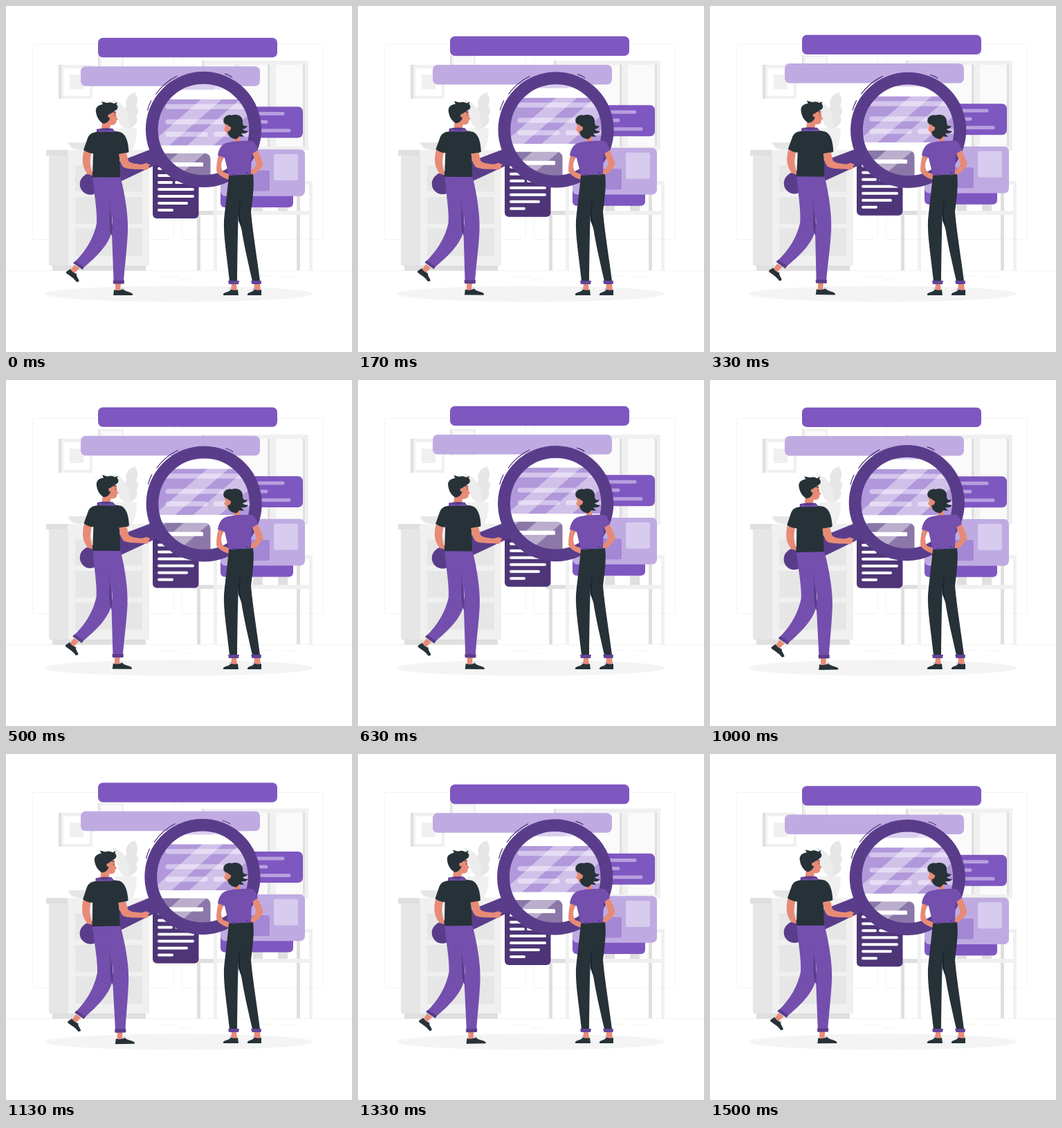
An HTML page that plays this animation: 500x500 px, repeating every 1540 ms.

```html
<!DOCTYPE html>
<html lang="en">
<head>
<meta charset="utf-8">
<title>Search illustration</title>
<style>
  html, body { margin: 0; width: 100%; height: 100%; overflow: hidden; background: #fff; }
  svg { display: block; width: 100%; height: 100%; }
  .dark { fill: #263238; }
  .plum { fill: #5a3d8a; }
  .violet { fill: #744fae; }
  .skin { fill: #e78b77; }
  .g1 { fill: #f0f0f0; }
  .g2 { fill: #e6e6e6; }
  .g3 { fill: #dfdfdf; }
  .pane { fill: #fafafa; }
  .deep { fill: #7f57c1; }
  .pale { fill: #bfabe2; }
</style>
</head>
<body>
<svg viewBox="0 0 500 500" xmlns="http://www.w3.org/2000/svg">
  <defs>
    <clipPath id="glass"><circle id="hole" cx="285.5" cy="178.5" r="67"/></clipPath>
  </defs>

  <!-- room -->
  <g fill="none" stroke="#f3f3f3">
    <rect x="38.5" y="55.5" width="204" height="282" rx="3"/>
    <rect x="254.5" y="55.5" width="204" height="282" rx="3"/>
    <path d="M0 382.5H500M223 391.5h25M249 395.5h15M372 390.5h10M400 391.5h19"/>
  </g>
  <ellipse cx="249.5" cy="416" rx="194" ry="11.5" fill="#f4f4f4"/>

  <g id="frames">
    <rect class="g1" x="133" y="71" width="37" height="38"/>
    <rect class="g3" x="133" y="71" width="2" height="38"/>
    <rect class="pane" x="138" y="74" width="29" height="31"/>
    <rect class="g1" x="76" y="85" width="49" height="49"/>
    <rect class="g3" x="76" y="85" width="4" height="49"/>
    <rect fill="#fff" x="83" y="90" width="38" height="40"/>
    <rect class="g1" x="92" y="99" width="20" height="21"/>
  </g>

  <g id="window">
    <rect class="g1" x="283" y="79" width="154" height="130"/>
    <rect class="g3" x="283" y="79" width="3" height="130"/>
    <rect class="pane" x="289" y="85" width="42" height="118"/>
    <rect class="pane" x="340" y="85" width="38" height="118"/>
    <rect class="pane" x="390" y="85" width="39" height="118"/>
    <path class="g3" d="M331 85h3v118h-3zM378 85h3.500v118h-3.500zM429 85h3v118h-3z"/>
  </g>

  <g id="table">
    <path class="g1" d="M432 253h11v129h-5V258h-6zM300 253h5v129h-5z"/>
    <path class="g3" d="M276 302h5v80h-5zM420 258h5v124h-5zM357 282h14v14h-14zM393 282h14v14h-14z"/>
    <rect class="g1" x="271" y="296" width="172" height="6"/>
    <rect class="g3" x="271" y="296" width="29" height="6"/>
  </g>

  <g id="cabinet">
    <path class="g2" d="M172 178C168 160 171 150 174 145C171 135 178 127 186 125C190 131 192 138 188 145C192 149 192 155 188 159C192 165 188 172 182 175L176 180Z"/>
    <path fill="#ececec" d="M176 180C164 175 160 160 158 150C156 144 155 139 153 135C168 139 178 150 180 178Z"/>
    <path class="g1" d="M158 177H189C189 192 186 202 182 208H165C160 200 158 190 158 177Z"/>
    <path class="g2" d="M90 197H126C125 204 118 208 108 208S91 204 90 197Z"/>
    <rect class="g1" x="89" y="208" width="122" height="8"/>
    <rect class="g3" x="58" y="208" width="31" height="8"/>
    <rect class="g3" x="67" y="375" width="135" height="7.500"/>
    <rect class="g2" x="62" y="216" width="28" height="159"/>
    <rect class="g1" x="90" y="216" width="117" height="159"/>
    <path class="g2" d="M100 230h97v38h-97zM100 276h97v38.500h-97zM100 321.500h97v39.500h-97z"/>
  </g>

  <!-- floating panels -->
  <g id="panels">
    <rect class="deep" x="133" y="46" width="259" height="28.300" rx="7"/>
    <rect class="pale" x="108" y="87.300" width="259" height="28.500" rx="7"/>
    <rect class="deep" x="330" y="145.600" width="99" height="45" rx="7"/>
    <path d="M340 155.500H400M340 167.500H376M340 180H409" stroke="#b79fdf" stroke-width="5" stroke-linecap="round"/>
    <rect class="deep" x="310" y="225" width="105" height="66" rx="6"/>
    <rect class="pale" x="310" y="207.300" width="122" height="67.500" rx="7"/>
    <rect x="387" y="214" width="35" height="38" rx="3" fill="#d7cbee"/>
    <rect x="340" y="237.500" width="41" height="30" rx="3" fill="#a488d3"/>
    <rect x="212" y="213" width="66.500" height="94" rx="6" fill="#4e3578"/>
    <path d="M221 235h9M221 245h18M221 255h18M246 255h24M221 265h49M221 275h49M221 285h40M221 295h19" stroke="#fff" stroke-width="4" stroke-linecap="round"/>
  </g>

  <!-- view through the glass -->
  <g clip-path="url(#glass)">
    <rect x="200" y="90" width="180" height="180" fill="#fff"/>
    <g id="zoom">
      <rect x="190" y="80" width="180" height="41" fill="#d9cdee"/>
      <rect x="190" y="135" width="180" height="66.500" fill="#b198da"/>
      <path d="M234 145.500H350M234 167.500H311M234 185.500H288M303.500 185.500H350" stroke="#d3c5ec" stroke-width="7.200" stroke-linecap="round"/>
      <rect x="190" y="213" width="105.500" height="60" rx="8" fill="#8b78a9"/>
      <rect x="215" y="226" width="70" height="6" rx="1.500" fill="#fff"/>
    </g>
    <g id="glare" fill="#fff" fill-opacity=".4">
      <path d="M282 135L312 135L186 245H156ZM282 135L328 95H358L312 135Z"/>
      <path d="M338 135L376 135L250 245H212Z"/>
    </g>
  </g>

  <!-- man with magnifier -->
  <g id="man">
    <path class="plum" d="M114 244L212 206L228 224L131 270Z"/>
    <circle class="plum" cx="122" cy="257.500" r="15.300"/>
    <circle cx="285.500" cy="178.500" r="74.700" fill="none" stroke="#5a3d8a" stroke-width="17.800"/>
    <path d="M216.500 127.500Q229 110 247.500 101M204.500 151Q206.500 143 210 136.500M316 98Q322 99.500 327 103" fill="none" stroke="#4a3274" stroke-width="1.200"/>

    <path class="skin" d="M113 207C109 222 110 233 118 243L125 245L124 238C121 230 121 221 124 211Z"/>
    <path class="skin" d="M99 374L106 379L98 387L93 382ZM158 400H166L165 412H158Z"/>
    <path class="dark" d="M87 384L93 380C95 384 98 386 102 387C101 391 106 395 105.500 398L102 399C98 393 92 390 87 386Z"/>
    <path class="dark" d="M155 418L156 410C160 412 165 411 169 409C172 413 180 413 183 416V418Z"/>
    <path d="M98 384L101 387L103 385M165 410L168 407L171 411" fill="none" stroke="#b9a8cf" stroke-width=".8"/>
    <path class="violet" d="M125 246H155L153 325C149 345 130 363 111 379L98 371C116 354 127 334 131 314C132 295 127 270 125 246Z"/>
    <path class="plum" d="M148.500 279L157 340L152 330C148 320 151 300 148.500 279Z"/>
    <path class="violet" d="M137 246H165C171 267 177 302 176 325C175 350 171 380 170 398H155.500L153 329C156 309 152 292 148.500 279Z"/>
    <path class="plum" d="M97 371.500L100 368.500L113 377L110.500 381ZM154.500 396.500H171L170.500 401.500H155Z"/>

    <path class="skin" d="M139 167L148 167C153 172 150 175 150 178C147 181 142 181 138 178Z"/>
    <path class="skin" d="M146 154C150 149 157 149 159 153L159.500 160L162 164L159.500 165.500C160 170 157 172.500 151 172L145 169Z"/>
    <path class="dark" d="M130 153C129 146 134 143 140 142L138 138L146 140C151 138 155 140 156 141L161 139L159.500 142C163 145 162 150 157 151.500C155 155 152 153 150.500 157C152 163 147 170 140.500 170C134 166 131 160 130 153Z"/>
    <circle class="skin" cx="150" cy="159" r="2.700"/>
    <path d="M155.500 154.500l3-1M157.500 157.500v1.500" stroke="#263238"/>
    <path class="dark" d="M131 182C123 183 120 186 118 191L112 208C116 211 121 213 126 213L125 247.500H165L164 214C169 214 174 213 177.500 211C177 198 174 186 166 182.500C157 180 142 180 131 182Z"/>
    <path class="plum" d="M131 178C138 176 148 176 154 177L158 182H131Z"/>
    <path class="violet" d="M134 178C140 181 148 181 153 178L157 182H133Z"/>
    <path class="skin" d="M163 214L174 212L177 224C181 228 188 228 196 229L203 227L208.500 229.500L206 232L207 234L203 237L195 236C187 236 176 236 170 233C165 228 164 220 163 214Z"/>
  </g>

  <!-- woman -->
  <g id="woman">
    <path class="skin" d="M326 402H333L334 412H325ZM359 402H367L368 412H358Z"/>
    <path class="dark" d="M314 418V416C317 413 322 414 325 409.500C328 411 332 411 335 410L336 418ZM349 418V416C352 413 356 414 359 409.500C362 411 366 411 369 410V418Z"/>
    <path d="M322 410l3-3 2 3M356 410l3-3 2 3" fill="none" stroke="#b9a8cf" stroke-width=".8"/>
    <path class="skin" d="M329 187L338 187C338 191 337 194 340 196L330 198Z"/>
    <path class="skin" d="M316 170C318 167 327 169 327 176L328 185C324 188 319 187 318 182L315 179L317 175Z"/>
    <path class="dark" d="M315 169C312 162 319 156 326 158C335 155 343 160 342 168C342 173 345 174 349 173.500C347 177 344 177.500 342 178C344 181 347 180 350 181C347 185 342 184 340 184.500L344 189L337 188.500L333 192.500C325 192 320 187 320.500 181L324 180C325 175 322 172 318 171Z"/>
    <circle class="skin" cx="323" cy="176.500" r="2.200"/>
    <path class="skin" d="M307 216L315 219C309 228 311 235 314 240L323 243L326 247L322 251C313 248 305 243 304 238C304 230 305 222 307 216ZM356 213L363 208C368 216 371.500 225 371.500 229C367 238 360 243 354 245L351 240C357 236 361 231 362 228Z"/>
    <path class="violet" d="M318 198C326 195 347 194 356 195C360 197 362 202 364 208L355 214L354 243L322 245L316 219.500L306 216C307 208 311 200 318 198Z"/>
    <path fill="#1a2433" d="M335 280L341 270L349 345L336 310Z"/>
    <path class="dark" d="M322 245L357 243C359 255 357 275 354 298C357 330 363 365 367 397.500H356C348 362 339 325 338 300L339 278C335 290 335 330 334 397.500H323C319 360 314 332 315 310C317 290 320 266 322 245Z"/>
    <path d="M329 242v5M349 240v5" stroke="#5a3d8a" stroke-width="1.500"/>
    <path d="M321 397H337L336 402H322ZM354 397H369L368.500 402H355.500Z" fill="#62439a"/>
  </g>
</svg>
<script>
  const LOOP = 1540;
  const el = id => document.getElementById(id);
  const move = (id, value) => el(id).setAttribute('transform', value);

  // Linear swing: +1 at the peak time, -1 half a loop later.
  function swing(t, peak) {
    const p = (((t - peak) % LOOP) + LOOP) % LOOP / LOOP;
    return Math.abs(4 * p - 2) - 1;
  }

  function draw(t) {
    const float = `translate(0 ${-4.65 + 5 * swing(t, 1508)})`;
    const tilt = `rotate(${-0.13 + 0.97 * swing(t, 345)} 222 262)`;
    ['panels', 'zoom'].forEach(id => move(id, float));
    ['man', 'hole', 'glare'].forEach(id => move(id, tilt));
  }

  const start = performance.now();
  function tick() {
    draw((performance.now() - start) % LOOP);
    requestAnimationFrame(tick);
  }
  draw(0);
  requestAnimationFrame(tick);
</script>
</body>
</html>
```
